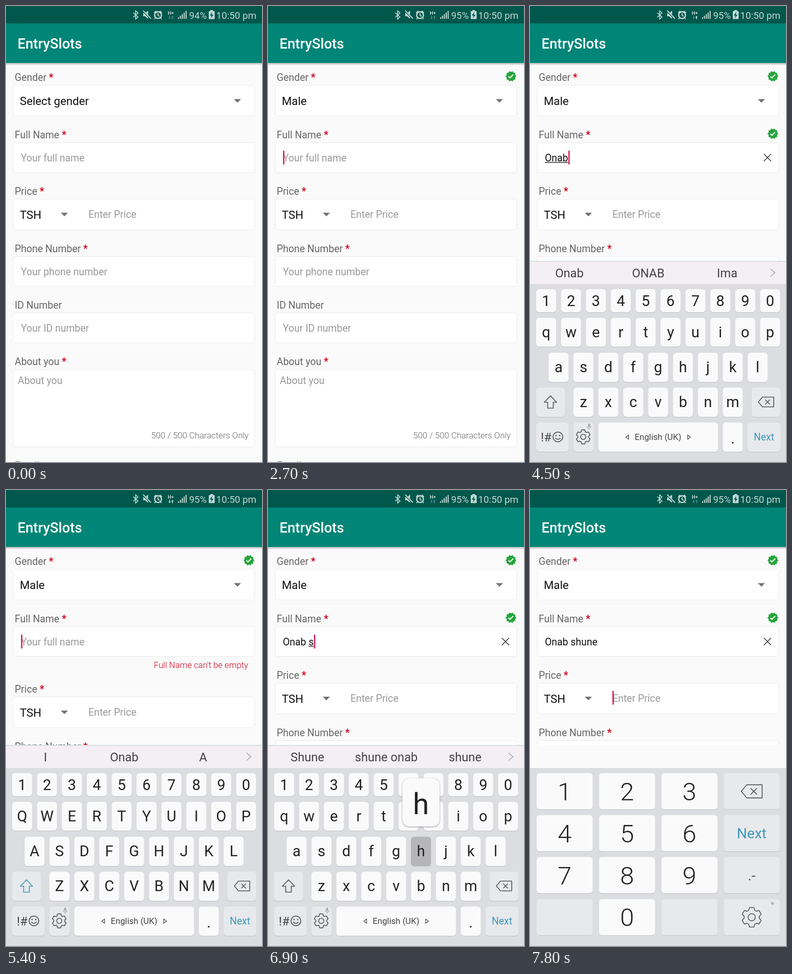
Animation of 500 by 889 pixels, one loop 8 s. Source, as an HTML page:

```html
<!DOCTYPE html>
<html lang="en">
<head>
<meta charset="utf-8">
<title>Form entry</title>
<style>
html, body { margin: 0; width: 100%; height: 100%; overflow: hidden; background: #fafafa; }
svg { display: block; width: 100%; height: 100%; font-family: Roboto, "Open Sans", sans-serif; }
text { white-space: pre; }
.menu { filter: drop-shadow(0 5px 6px #3a3a6a48); }
.popup { filter: drop-shadow(0 1px 1.5px #0006); }
</style>
</head>
<body>
<svg id="stage" viewBox="0 0 500 889" preserveAspectRatio="none"></svg>
<script>
const LOOP = 8000;
const FIRST = "Onab", LAST = "shune";
const INK = "#111", HINT = "#999", LABEL = "#666", RED = "#d0021b", TEAL = "#3b9bb8", ICON = "#c4d9d5";

const CAPS_WORDS = ["I", FIRST, "A"];
const NAME_WORDS = [FIRST, FIRST.toUpperCase(), "Ima"];
const LAST_WORDS = ["Shune", LAST + " onab", LAST];

// Each entry overrides the state from its time onward.
const timeline = [
  [0, { gender: "Select gender", percent: 94, net: "H+", arrows: 0, name: "", pad: "", words: [], caps: true }],
  [300, { arrows: 3 }],
  [900, { arrows: 0 }],
  [1500, { menu: true }],
  [2100, { menu: false, gender: "Male", genderOk: true }],
  [2400, { percent: 95 }],
  [2700, { cursor: true }],
  [3000, { cursor: false, pad: "letters", words: CAPS_WORDS }],
  [3300, { cursor: true, net: "H", arrows: 1 }],
  [3900, { name: "O", compose: true, caps: false, words: ["O", "Of", "On"], arrows: 3 }],
  [4200, { name: "On", words: ["On", FIRST, "In"], pressed: "a", popup: "a" }],
  [4500, { name: FIRST, words: NAME_WORDS, pressed: "", popup: "", net: "H+", arrows: 1 }],
  [4800, { name: "On", words: ["On", FIRST, "On account"] }],
  [5100, { name: "O", words: ["O", "Of", "On"], pressed: "back", arrows: 3 }],
  [5400, { name: "", caps: true, words: CAPS_WORDS, pressed: "", error: true }],
  [5700, { name: "O", caps: false, words: ["O", "Of", "On"], error: false, popup: "O", arrows: 0 }],
  [6000, { name: "On", words: [FIRST, "On", "In"], popup: "n", arrows: 3 }],
  [6300, { name: FIRST, words: NAME_WORDS, popup: "" }],
  [6600, { name: FIRST + " ", compose: false, words: ["is", "and", "from"], arrows: 0 }],
  [6900, { name: FIRST + " s", compose: true, words: LAST_WORDS, pressed: "h", popup: "h" }],
  [7200, { name: FIRST + " shun", pressed: "", popup: "" }],
  [7500, { name: FIRST + " " + LAST, cursor: false, pressed: "e", popup: "e" }],
  [7800, { compose: false, pressed: "", popup: "", pad: "numbers" }]
];

const measurer = document.createElement("canvas").getContext("2d");
function widthOf(s) {
  measurer.font = "19.4px Roboto, 'Open Sans', sans-serif";
  return measurer.measureText(s).width;
}

const text = (x, y, s, size = 19.4, fill = INK, extra = "") =>
  `<text x="${x}" y="${y}" font-size="${size}" fill="${fill}" ${extra}>${s}</text>`;
const mid = (x, y, s, size, fill, extra = "") => text(x, y, s, size, fill, `text-anchor="middle" ${extra}`);
const end = (x, y, s, size, fill, extra = "") => text(x, y, s, size, fill, `text-anchor="end" ${extra}`);
const rect = (x, y, w, h, fill, r = 0, extra = "") =>
  `<rect x="${x}" y="${y}" width="${w}" height="${h}" rx="${r}" fill="${fill}" ${extra}/>`;
const line = (d, color, w = 1.5, extra = "") =>
  `<path d="${d}" fill="none" stroke="${color}" stroke-width="${w}" ${extra}/>`;
const shape = (d, fill) => `<path d="${d}" fill="${fill}"/>`;
const circle = (x, y, r, extra) => `<circle cx="${x}" cy="${y}" r="${r}" ${extra}/>`;
const box = (y, h) => rect(14.5, y + .5, 471, h, "#fff", 4, 'stroke="#ebebeb"');
const caret = (x, y) => shape(`M${x - 7} ${y}h14l-7 7z`, "#737373");
const cursorBar = (x, y) => rect(x, y, 2.6, 27, "#d81b60");
const label = (y, s, required = true) =>
  text(17, y, s + (required ? ` <tspan font-weight="700" fill="${RED}"> *</tspan>`.replace("> *", ">*") : ""), 19.4, LABEL);

function polar(cx, cy, points) {
  return "M" + points.map(([r, deg]) => {
    const a = deg * Math.PI / 180;
    return (cx + r * Math.cos(a)).toFixed(2) + " " + (cy + r * Math.sin(a)).toFixed(2);
  }).join("L") + "Z";
}

function badge(y) {
  const star = Array.from({ length: 20 }, (_, i) => [i % 2 ? 8.6 : 10.6, i * 18]);
  return shape(polar(474.5, y, star), "#25a53c") + line(`M469.6 ${y + .2}l3 2.9 6.3-6.4`, "#fff", 2);
}

function gear(x, y, r) {
  const teeth = [];
  for (let a = -90; a < 270; a += 60)
    teeth.push([r * .76, a - 23], [r, a - 13], [r, a + 13], [r * .76, a + 23]);
  return line(polar(x, y, teeth), "#555", 1.6, 'stroke-linejoin="round"') +
    circle(x, y, r * .36, 'fill="none" stroke="#555" stroke-width="1.6"');
}

function backspace(x, y, k) {
  return line(`M${x - 15 * k} ${y}l${8 * k} ${-9.5 * k}h${22 * k}v${19 * k}h${-22 * k}z`, "#555", 1.6, 'stroke-linejoin="round"') +
    line(`M${x - 1.5 * k} ${y - 4.5 * k}l${9 * k} ${9 * k}m0 ${-9 * k}l${-9 * k} ${9 * k}`, "#555", 1.6);
}

function statusBar(s) {
  let out = rect(0, 0, 500, 34, "#00574b");
  out += line("M248.5 13l9.3 8.5-4.6 4V9.5l4.6 4-9.3 8.5", ICON, 1.6);
  out += shape("M268 14h3.5l6-5v16l-6-5H268z", ICON);
  out += line("M267.5 9.5l15 15", "#00574b", 3.5) + line("M268 9l15 15.5", ICON, 1.8);
  out += circle(297, 17.8, 6.6, `fill="none" stroke="${ICON}" stroke-width="2.4"`);
  out += line("M297 14v4.2l3 2M289.5 13.5l4-4M304.5 13.5l-4-4M292 23l-2 2.5M302 23l2 2.5", ICON, 1.9);
  out += text(316, 17, s.net, 9.5, ICON, 'font-weight="700"');
  const tone = bit => s.arrows & bit ? ICON : "#4d8a81";
  out += shape("M318.8 19h1.6v3.5h1.6l-2.4 3.3-2.4-3.3h1.6z", tone(2));
  out += shape("M324.4 25.8h1.6v-3.5h1.6l-2.4-3.3-2.4 3.3h1.6z", tone(1));
  for (let i = 0; i < 5; i++) {
    const h = 3 + i * 3.1;
    out += rect(336 + i * 3.7, 25 - h, 2, h, ICON);
  }
  out += end(392, 24.5, s.percent + "%", 18.5, ICON);
  out += rect(399, 8, 5.5, 3, ICON) + rect(396, 10, 11.5, 15.5, ICON, 1);
  out += shape("M403 11.5l-5 7h3.2l-1 5.5 5-7h-3.2z", "#00574b");
  return out + end(489, 24.5, "10:50 pm", 18.8, ICON);
}

function header(s) {
  return rect(0, 110, 500, 6, "url(#shade)") + rect(0, 34, 500, 77, "#008577") +
    text(22.5, 83, "EntrySlots", 27.5, "#fff", 'font-weight="500"') + statusBar(s);
}

function nameField(s) {
  let out = label(258, "Full Name") + box(266, 58);
  if (s.name) {
    out += text(29, 303, s.name) + badge(249) + line("M456.8 288.5l14 14m0-14l-14 14", "#333", 1.5);
    if (s.compose) {
      const from = s.name.lastIndexOf(" ") + 1;
      out += rect(29 + widthOf(s.name.slice(0, from)), 304.3, widthOf(s.name.slice(from)), 1.3, INK);
    }
  } else out += text(29, 303, "Your full name", 19.4, HINT);
  if (s.cursor) out += cursorBar(29.4 + widthOf(s.name), 282);
  if (s.error) out += end(473, 347, "Full Name can't be empty", 16.7, RED, 'font-weight="300"');
  return out;
}

function lowerFields(s) {
  let out = label(368, "Price") + box(376, 60) + text(27, 415, "TSH", 22.2) + caret(114, 403);
  out += text(161, 413, "Enter Price", 19.4, HINT);
  if (s.pad === "numbers") out += cursorBar(161, 391.5);
  out += label(480, "Phone Number") + box(488, 58) + text(29, 525, "Your phone number", 19.4, HINT);
  out += label(590, "ID Number", false) + box(598, 58) + text(29, 635, "Your ID number", 19.4, HINT);
  out += label(700, "About you") + box(708, 151) + text(23, 737, "About you", 19.4, HINT);
  out += end(474, 843, "500 / 500 Characters Only", 16.7, LABEL, 'font-weight="300"');
  out += label(902.5, "Email", false);
  return `<g transform="translate(0 ${s.error ? 27 : 0})">${out}</g>`;
}

function menu() {
  return `<g class="menu">${rect(15, 155, 403.5, 201, "#fafafa", 2)}</g>` +
    ["Select gender", "Male", "Female"].map((s, i) => text(27, 197.5 + i * 66.6, s, 22.2)).join("");
}

const keyCap = (x, y, w, h, fill = "#fafafa") =>
  rect(x, y + 1.2, w, h, "#c6c7cb", 6) + rect(x, y, w, h, fill, 6);
const SOFT = "#e8e9ed", DOWN = "#b6b6b8";

const rows = [
  { keys: "1234567890", x: 31.5, y: 552, h: 45 },
  { keys: "qwertyuiop", x: 31.5, y: 608, h: 56 },
  { keys: "asdfghjkl", x: 55.8, y: 676, h: 57 },
  { keys: "zxcvbnm", x: 104.4, y: 744, h: 57 }
];

function popupKey(letter) {
  const row = rows.find(r => r.keys.includes(letter.toLowerCase()));
  const x = row.x + 48.6 * row.keys.indexOf(letter.toLowerCase());
  return `<g class="popup">${rect(x - 36.3, row.y - 114, 72.6, 94, "#fafafa", 14)}</g>` +
    mid(x, row.y - 44.5, letter, 57, "#222");
}

function letterPad(s) {
  let out = rect(0, 497, 500, 45, "#f4eff3") + rect(0, 497, 500, 1.5, "#d3dadd");
  out += s.words.map((w, i) => mid(77 + i * 154, 529, w, 23.7, "#444")).join("");
  out += line("M469.5 512.5l9 7.5-9 7.5", "#aaa", 1.6);
  out += rect(0, 542, 500, 347, "#dcdde1");
  for (const { keys, x, y, h } of rows)
    [...keys].forEach((k, i) => {
      const cx = x + 48.6 * i;
      out += keyCap(cx - 19.5, y, 39, h, s.pressed === k ? DOWN : "#fafafa");
      out += mid(cx, y + (h < 50 ? 32.5 : 38.2), s.caps ? k.toUpperCase() : k, 29, "#222");
    });
  out += keyCap(12, 744, 56, 57, SOFT) +
    line("M40 760l12 12.5h-6.5v11.5h-11v-11.5H28z", s.caps ? TEAL : "#555", 1.7, 'stroke-linejoin="round"');
  out += keyCap(432.5, 744, 56.5, 57, s.pressed === "back" ? DOWN : SOFT) + backspace(461, 772, 1);
  out += keyCap(12, 812, 63, 57, SOFT) + text(21, 849, "!#", 24, "#444");
  out += circle(54.5, 840, 9.5, 'fill="none" stroke="#444" stroke-width="1.6"') +
    circle(51, 837.5, 1.3, 'fill="#444"') + circle(58, 837.5, 1.3, 'fill="#444"') +
    line("M49.5 842q5 5.5 10 0", "#444", 1.5);
  out += keyCap(85, 812, 39, 57, SOFT) + gear(104, 840, 14);
  out += rect(113.5, 814, 4, 7, "#aaa", 2) + line("M111.8 819q0 4 3.7 4t3.7-4M115.5 823v3", "#aaa", 1.1);
  out += keyCap(133.5, 812, 233.5, 57) + mid(250, 846, "English (UK)", 16.7, "#444");
  out += line("M192.5 836.5v8l-5.5-4zM308 836.5v8l5.5-4z", "#444", 1.2);
  out += keyCap(376.5, 812, 39, 57) + mid(396, 853, ".", 29, "#222");
  out += keyCap(425, 812, 64, 57, SOFT) + mid(457, 847, "Next", 19.4, TEAL);
  return out + (s.popup ? popupKey(s.popup) : "");
}

function numberPad() {
  let out = rect(0, 497, 500, 45, "#fafafa") + rect(0, 542, 500, 347, "#dcdde1");
  for (let row = 0; row < 4; row++)
    for (let col = 0; col < 4; col++) {
      const x = 13 + col * 121.8, y = 552 + row * 81.8;
      const digit = col > 2 ? "" : row < 3 ? row * 3 + col + 1 : col === 1 ? 0 : "";
      out += keyCap(x, y, 109.5, 70.5, digit === "" ? SOFT : "#fafafa");
      out += mid(x + 54.7, y + 53, digit, 49, "#222", 'font-weight="300"');
    }
  out += backspace(433, 587.5, 1.36) + mid(433, 679, "Next", 28, TEAL) + mid(433, 761, ".-", 28, "#555");
  return out + gear(433, 833, 19.5) + circle(473.5, 806, 2.7, 'fill="#b0b0b3"');
}

function scene(s) {
  return `<defs><linearGradient id="shade" x2="0" y2="1"><stop stop-color="#000" stop-opacity=".32"/>
    <stop offset="1" stop-color="#000" stop-opacity="0"/></linearGradient></defs>` +
    rect(0, 0, 500, 889, "#fafafa") +
    label(146, "Gender") + box(154, 60) + text(27, 193, s.gender, 22.2) + caret(452, 181.5) +
    (s.genderOk ? badge(137) : "") + nameField(s) + lowerFields(s) + (s.menu ? menu() : "") +
    (s.pad === "letters" ? letterPad(s) : s.pad === "numbers" ? numberPad() : "") + header(s);
}

const stage = document.getElementById("stage");
let shown = -1;

function draw(now) {
  const t = now % LOOP;
  const count = timeline.filter(([at]) => at <= t).length;
  if (count !== shown) {
    shown = count;
    stage.innerHTML = scene(Object.assign({}, ...timeline.slice(0, count).map(step => step[1])));
  }
}

const start = performance.now();
function tick() {
  draw(performance.now() - start);
  requestAnimationFrame(tick);
}
tick();
</script>
</body>
</html>
```
